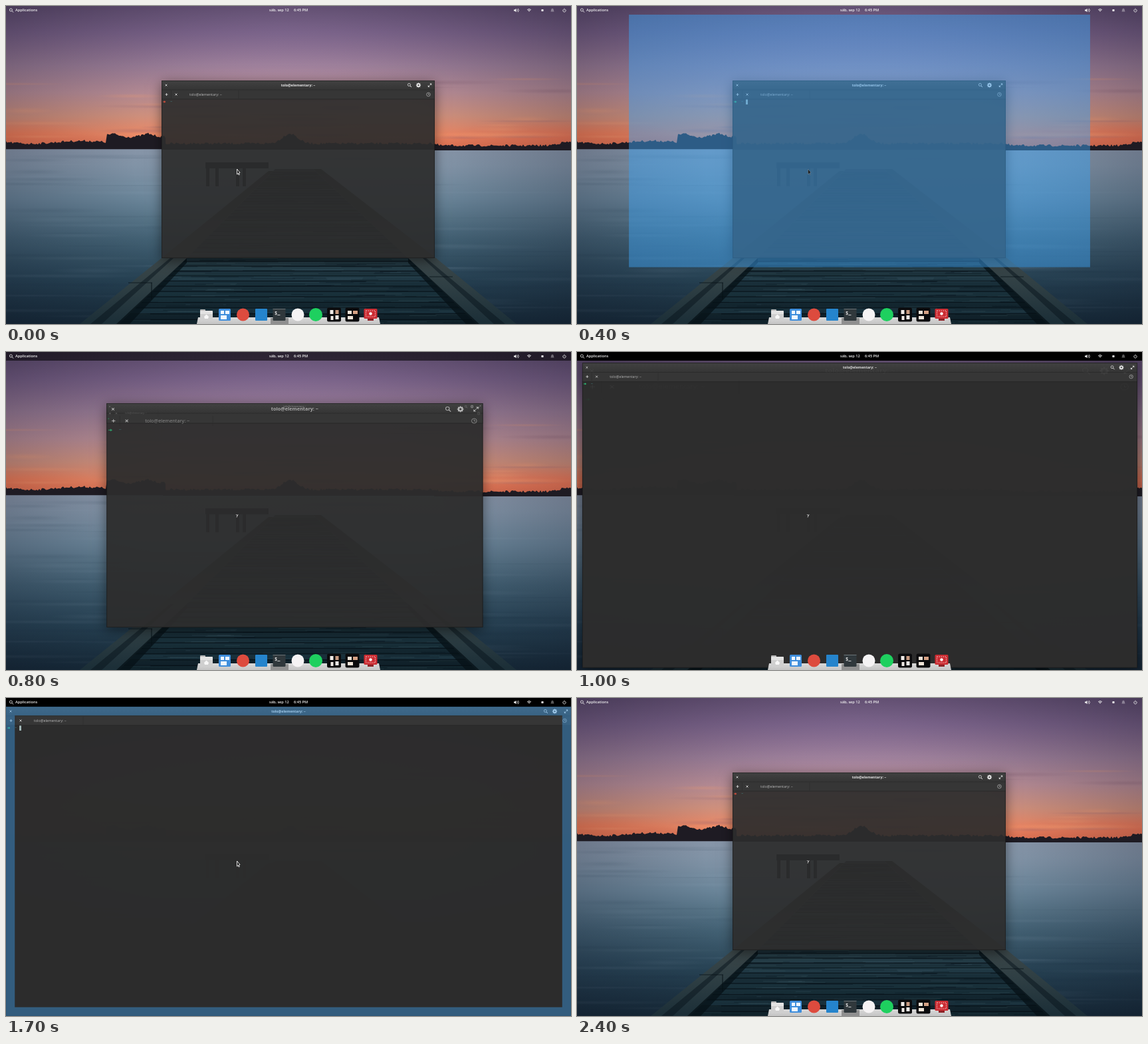
An HTML page with a canvas for the animation above (2500 ms loop, 850x478 px).

```html
<!DOCTYPE html>
<html lang="en">
<head>
<meta charset="utf-8">
<title>Window gestures</title>
<style>
html, body { margin: 0; width: 100%; height: 100%; overflow: hidden; background: #000; }
canvas { display: block; width: 850px; height: 478px; }
</style>
</head>
<body>
<canvas id="stage" width="850" height="478"></canvas>
<script>
const W = 850, H = 478, BAR = 13, LOOP = 2500, STEP = 100;
const stage = document.getElementById('stage').getContext('2d');
const wallpaper = document.createElement('canvas');
wallpaper.width = W;
wallpaper.height = H;
let c = wallpaper.getContext('2d');

let seed = 7;
const rnd = () => (seed = (seed * 16807) % 2147483647) / 2147483647;
const clamp = v => Math.max(0, Math.min(1, v));
const mix = (a, b, k) => a + (b - a) * k;
const easeOut = x => 1 - (1 - clamp(x)) ** 3;

function rect(x, y, w, h, fill) {
  c.fillStyle = fill;
  c.fillRect(x, y, w, h);
}
function round(x, y, w, h, r, fill) {
  c.fillStyle = fill;
  c.beginPath();
  c.roundRect(x, y, w, h, r);
  c.fill();
}
function disc(x, y, r, fill) {
  c.fillStyle = fill;
  c.beginPath();
  c.arc(x, y, r, 0, 7);
  c.fill();
}
function arc(x, y, r, color, from = 0, to = 2 * Math.PI, width = 0.8) {
  c.strokeStyle = color;
  c.lineWidth = width;
  c.beginPath();
  c.arc(x, y, r, from, to);
  c.stroke();
}
function poly(points, fill) {
  c.fillStyle = fill;
  c.beginPath();
  points.forEach(p => c.lineTo(...p));
  c.closePath();
  c.fill();
}
function line(x1, y1, x2, y2, color, width = 0.8) {
  c.strokeStyle = color;
  c.lineWidth = width;
  c.beginPath();
  c.moveTo(x1, y1);
  c.lineTo(x2, y2);
  c.stroke();
}
function text(s, x, y, size, weight, color, align = 'left') {
  c.font = `${weight} ${size}px "Open Sans", sans-serif`;
  c.textAlign = align;
  c.textBaseline = 'middle';
  c.fillStyle = color;
  c.fillText(s, x, y);
}
function gradient(y0, y1, stops) {
  const g = c.createLinearGradient(0, y0, 0, y1);
  stops.forEach(([y, color]) => g.addColorStop((y - y0) / (y1 - y0), color));
  return g;
}
function glow(x, y, rx, ry, rgb, alpha) {
  c.save();
  c.translate(x, y);
  c.scale(rx, ry);
  const g = c.createRadialGradient(0, 0, 0, 0, 0, 1);
  g.addColorStop(0, `rgba(${rgb},${alpha})`);
  g.addColorStop(1, `rgba(${rgb},0)`);
  rect(-1, -1, 2, 2, g);
  c.restore();
}

function paintSky() {
  rect(0, 0, W, 217, gradient(0, 217, [[0, '#715a80'], [40, '#866b94'], [90, '#a5859f'],
    [130, '#bd919a'], [165, '#d3937f'], [192, '#ea8765'], [217, '#dc6a4c']]));
  glow(425, 30, 420, 110, '165,140,185', 0.2);
  glow(0, 195, 150, 25, '255,110,65', 0.4);
  glow(850, 195, 200, 25, '255,105,70', 0.4);
  for (let i = 0; i < 40; i++) {
    const y = 110 + rnd() * 95;
    glow(rnd() * W, y, 35 + rnd() * 90, 1.5 + rnd() * 4,
      i % 2 ? '135,95,115' : '255,165,120', 0.28);
  }
}
function paintWater() {
  rect(0, 214, W, 264, gradient(214, 478, [[214, '#8795a8'], [240, '#8193a6'], [290, '#6a8599'],
    [350, '#466679'], [410, '#2b4b5d'], [478, '#18313f']]));
  for (let i = 0; i < 90; i++) {
    const y = 218 + rnd() * 250;
    glow(rnd() * W, y, 50 + rnd() * 130, 1 + rnd() * 4, i % 2 ? '150,175,195' : '25,50,70', 0.1);
  }
}
function paintVignette() {
  c.save();
  c.translate(W / 2, H / 2);
  c.scale(W / H, 1);
  const g = c.createRadialGradient(0, 0, 130, 0, 0, 340);
  g.addColorStop(0, 'rgba(12,12,28,0)');
  g.addColorStop(1, 'rgba(12,12,28,.4)');
  rect(-H / 2, -H / 2, H, H, g);
  c.restore();
}
function trees(x0, x1, top, base) {
  const points = [[x0, base]];
  for (let x = x0; x <= x1; x += 2) points.push([x, top(x) + rnd() * 3.5]);
  poly([...points, [x1, base]], '#1e1b23');
}
function paintPier() {
  trees(0, 240, x => x > 150 ? 190 + 5 * Math.abs(Math.sin(x / 17)) : 203 + 2 * Math.sin(x / 24), 215.3);
  trees(236, 650, x => 205 - 15 * Math.exp(-(((x - 427) / 16) ** 2)), 216);
  trees(644, W, x => 208 - 5 * clamp((x - 815) / 25), 217);
  rect(300, 235, 95, 9, '#141c22');
  for (const x of [301, 315, 346, 356]) rect(x, 243, 5, 28, '#141c22');

  const deck = [[405, 245], [462, 245], [605, 379], [708, 478], [170, 478], [272, 379]];
  poly(deck, gradient(245, 478, [[245, '#26353d'], [379, '#2a444f'], [430, '#1f3a46'], [478, '#142832']]));
  c.save();
  c.clip();
  for (let y = 250, h = 2; y < H; y += h, h += 0.17) {
    rect(120, y, 620, h, `rgba(6,16,22,${rnd() * 0.4})`);
    line(120, y, 750, y, 'rgba(4,11,16,.7)', 1.2);
    for (let i = 0; i < 12; i++) {
      const x = 160 + rnd() * 540, grainY = y + rnd() * h;
      line(x, grainY, x + 20 + rnd() * 60, grainY,
        i % 2 ? 'rgba(95,130,140,.22)' : 'rgba(5,15,22,.4)', 0.8);
    }
  }
  c.restore();

  const wood = gradient(245, 478, [[245, '#20292e'], [379, '#3b4648'], [420, '#2f3f44'], [478, '#1b2e37']]);
  poly([[395, 248], [402, 248], [272, 379], [170, 478], [111, 478], [234, 379]], wood);
  poly([[462, 245], [474, 245], [647, 379], [768, 478], [708, 478], [605, 379]], wood);
  const dark = 'rgba(6,16,22,.75)';
  poly([[272, 379], [272, 386], [186, 478], [166, 478]], dark);
  poly([[605, 379], [605, 386], [692, 478], [712, 478]], dark);
  poly([[247, 379], [252, 379], [144, 478], [127, 478]], 'rgba(8,20,28,.5)');
  poly([[627, 379], [632, 379], [751, 478], [734, 478]], 'rgba(8,20,28,.5)');
  line(184, 416, 220, 416, dark, 1.2);
  line(219, 416, 219, 441, dark, 1.2);
  line(637, 407, 672, 407, dark, 1.2);
}
paintSky();
paintWater();
paintVignette();
paintPier();
c = stage;

function cross(x, y, r, color) {
  line(x - r, y - r, x + r, y + r, color);
  line(x - r, y + r, x + r, y - r, color);
}
function lens(x, y, color) {
  arc(x - 0.6, y - 0.6, 2, color);
  line(x + 0.9, y + 0.9, x + 3, y + 3, color, 1);
}

function panel(solid) {
  rect(0, 0, W, BAR, `rgba(0,0,0,${solid})`);
  const ink = '#f2f2f2';
  lens(8, 6.5, ink);
  text('Applications', 14, 6.6, 5.6, 600, ink);
  text('sáb, sep 12', 396, 6.6, 5.6, 600, ink);
  text('6:45 PM', 433, 6.6, 5.6, 600, ink);
  poly([[764, 5.5], [765.5, 5.5], [767.5, 3.8], [767.5, 9.2], [765.5, 7.6], [764, 7.6]], ink);
  arc(767.5, 6.5, 2, ink, -0.9, 0.9);
  arc(767.5, 6.5, 3.8, ink, -0.8, 0.8);
  for (const r of [1.5, 3, 4.5]) arc(787, 9, r, ink, -2.3, -0.84);
  rect(805.5, 5, 3, 3, ink);
  poly([[819.5, 8.5], [820.5, 4.5], [822, 3.5], [823.5, 4.5], [824.5, 8.5]], 'rgba(255,255,255,.35)');
  arc(840, 6.8, 2.2, ink, -0.9, 4.04);
  line(840, 3.5, 840, 6.5, ink);
}

// Window furniture laid out for a window of width w at the current transform.
function chrome(w, t) {
  const ink = '#e4e4e4', dim = '#b8b8b8', name = 'tolo@elementary: ~';
  cross(7, 7, 1.4, ink);
  text(name, w / 2, 7.2, 5.3, 700, ink, 'center');
  lens(w - 38, 7, ink);
  arc(w - 24.5, 7, 2, ink, 0, 7, 1.8);
  for (let a = 0; a < 6.2; a += Math.PI / 4) {
    const x = Math.cos(a), y = Math.sin(a);
    line(w - 24.5 + 2 * x, 7 + 2 * y, w - 24.5 + 3.6 * x, 7 + 3.6 * y, ink, 1.1);
  }
  line(w - 9.8, 9.4, w - 5.2, 4.8, ink, 0.7);
  poly([[w - 7.6, 4.4], [w - 4.8, 4.4], [w - 4.8, 7.2]], ink);
  poly([[w - 10.2, 7], [w - 10.2, 9.8], [w - 7.4, 9.8]], ink);

  line(5.5, 21, 9.5, 21, ink);
  line(7.5, 19, 7.5, 23, ink);
  cross(22, 21, 1.5, ink);
  text(name, 42, 21.2, 5.35, 400, dim);
  line(14.5, 15, 14.5, 27, '#2b2b2b', 0.6);
  line(116, 15, 116, 27, '#2d2d2d', 0.6);
  arc(w - 9.5, 21, 2.8, dim, 0, 7, 0.7);
  line(w - 9.5, 19.3, w - 9.5, 21.2, dim, 0.7);
  line(w - 9.5, 21.2, w - 8, 21.2, dim, 0.7);

  const arrow = t < 100 || t >= 2100 ? '#e0503c' : '#2fc07a';
  line(2, 32, 5, 32, arrow, 1);
  poly([[4, 30.3], [6.4, 32], [4, 33.7]], arrow);
  text('~', 13.3, 32, 5, 400, '#4f9a9a');
  const blink = (t >= 100 && t < 800) || (t >= 1300 && t < 1900);
  if (blink) rect(20, 28.5, 3, 7.5, '#9fb4b4');
}

function shadowAround(x, y, w, h) {
  c.save();
  c.beginPath();
  c.rect(0, 0, W, H);
  c.rect(x, y, w, h);
  c.clip('evenodd');
  c.shadowColor = 'rgba(0,0,0,.5)';
  c.shadowBlur = 18;
  c.shadowOffsetY = 4;
  rect(x, y, w, h, '#000');
  c.restore();
}

function terminal(m, t) {
  const x = mix(234, 0, m), y = mix(112, BAR, m);
  const w = mix(411, W, m), h = mix(267, H - BAR, m);
  const barH = mix(14 * h / 267, 14 * h / 465, m);
  shadowAround(x, y, w, h);
  rect(x, y, w, h, `rgba(45,45,45,${mix(0.925, 0.995, m)})`);
  rect(x, y, w, barH, gradient(y, y + barH, [[y, '#414141'], [y + barH, '#353535']]));
  rect(x, y + barH, w, barH, '#363636');
  line(x, y + barH, x + w, y + barH, '#292929', 0.7);
  line(x, y + 2 * barH, x + w, y + 2 * barH, '#232323', 0.7);
  c.strokeStyle = 'rgba(20,20,20,.6)';
  c.lineWidth = 0.8;
  c.strokeRect(x + 0.4, y + 0.4, w - 0.8, h - 0.8);

  for (const [fullW, fullH, alpha] of [[411, 267, 1 - m], [W, H - BAR, m]]) {
    if (alpha < 0.01) continue;
    c.save();
    c.globalAlpha = alpha;
    c.translate(x, y);
    c.scale(w / fullW, h / fullH);
    chrome(fullW, t);
    c.restore();
  }
}

function tiles(x, list, color) {
  list.forEach(([dx, dy, w, h]) => rect(x + dx, 464 + dy, w, h, color));
}
function dock(hidden) {
  c.save();
  c.translate(0, hidden * 30);
  poly([[289, 468], [561, 468], [563, 478], [287, 478]], gradient(468, 478, [[468, '#d9d9d9'], [478, '#c4c4c4']]));
  rect(398, 469, 27, 9, '#8f8f8f');

  round(292, 456, 8, 5, 1, '#b5b5b5');
  round(292, 458, 19, 15, 1, '#e3e3e3');
  rect(292, 463, 19, 10, '#cfcfcf');
  poly([[298, 467], [301.5, 463.5], [305, 467], [304, 470], [299, 470]], '#f7f7f7');

  round(320, 455, 18, 18, 1.5, '#3f8edc');
  tiles(329, [[-6, -6, 5, 5], [1, -6, 6, 5], [-6, 1, 9, 6]], '#eef6ff');

  disc(356.5, 464, 9.5, '#dd4b3e');
  round(375, 455, 18, 18, 1, '#2584cc');

  round(401.5, 455, 19, 18, 1.5, '#30383c');
  rect(401.5, 455, 19, 1, '#6b7478');
  c.font = '700 7px "Noto Sans Mono", monospace';
  c.textAlign = 'left';
  c.fillStyle = '#e6e6e6';
  c.fillText('$_', 404, 462);

  disc(439, 464, 9.5, '#f5f3f4');
  disc(466, 464, 10, '#1ed05f');

  for (const x of [493.5, 521]) round(x - 10.5, 453.5, 21, 21, 2.5, '#0b0b0d');
  tiles(493.5, [[-6, -7, 5, 6], [-5, 2, 4, 6], [2, 1, 5, 6]], '#f0ebe7');
  tiles(493.5, [[2, -7, 5, 6]], '#c79a80');
  tiles(521, [[-7, -6, 6, 5], [-7, 2, 8, 5]], '#f0e4d8');
  tiles(521, [[1, -6, 7, 5]], '#d6a184');

  round(538.5, 455, 20, 15, 1.5, '#cb2c32');
  c.setLineDash([1.5, 1.5]);
  c.strokeStyle = '#f6d6d6';
  c.lineWidth = 0.9;
  c.strokeRect(541.5, 458, 14, 9);
  c.setLineDash([]);
  disc(548.5, 462.5, 2.2, '#fff');
  rect(544, 470, 9, 3, '#8d2226');
  c.restore();
}

const tint = p => `rgba(62,159,237,${0.6 * p})`;

function growPreview(p) {
  const w = W * p;
  rect((W - w) / 2, BAR, w, (H - BAR) * p, tint(p));
}
function framePreview(p) {
  const edge = 18.5 * p;
  c.fillStyle = tint(p);
  c.beginPath();
  c.rect(0, BAR, W, H - BAR);
  c.rect(edge, BAR + edge, W - 2 * edge, H - BAR - 2 * edge);
  c.fill('evenodd');
}

function pointer(t) {
  if ((t >= 800 && t < 1300) || t >= 1900) {
    line(346, 244, 348, 246, '#eee');
    line(349, 244, 347, 248.5, '#eee');
    return;
  }
  const busy = t >= 100 && t < 800;
  c.beginPath();
  [[347.5, 245], [347.5, 253], [349.3, 251.5], [350.3, 254], [351.2, 253.5], [350.2, 251], [352, 250.5]]
    .forEach(p => c.lineTo(...p));
  c.closePath();
  c.fillStyle = '#1c1c1c';
  c.fill();
  c.strokeStyle = busy ? '#7f9db5' : '#f4f4f4';
  c.lineWidth = busy ? 0.5 : 0.9;
  c.stroke();
}

function draw(now) {
  const t = Math.floor((now % LOOP) / STEP) * STEP;
  const m = t < 1500 ? easeOut((t - 750) / 370) : 1 - easeOut((t - 1937) / 370);
  const hidden = t < 1700 ? clamp((t - 1100) / 200) : 1 - clamp((t - 2050) / 250);
  c.drawImage(wallpaper, 0, 0);
  terminal(m, t);
  panel(Math.min(1, m * 1.6));
  if (hidden < 1) dock(hidden);
  if (t > 0 && t < 800) growPreview(1 - (1 - clamp(t / 700)) ** 2);
  if (t >= 1300 && t < 1900) framePreview((t - 1200) / 700);
  pointer(t);
}

const start = performance.now();
function tick() {
  draw(performance.now() - start);
  requestAnimationFrame(tick);
}
tick();
</script>
</body>
</html>
```
